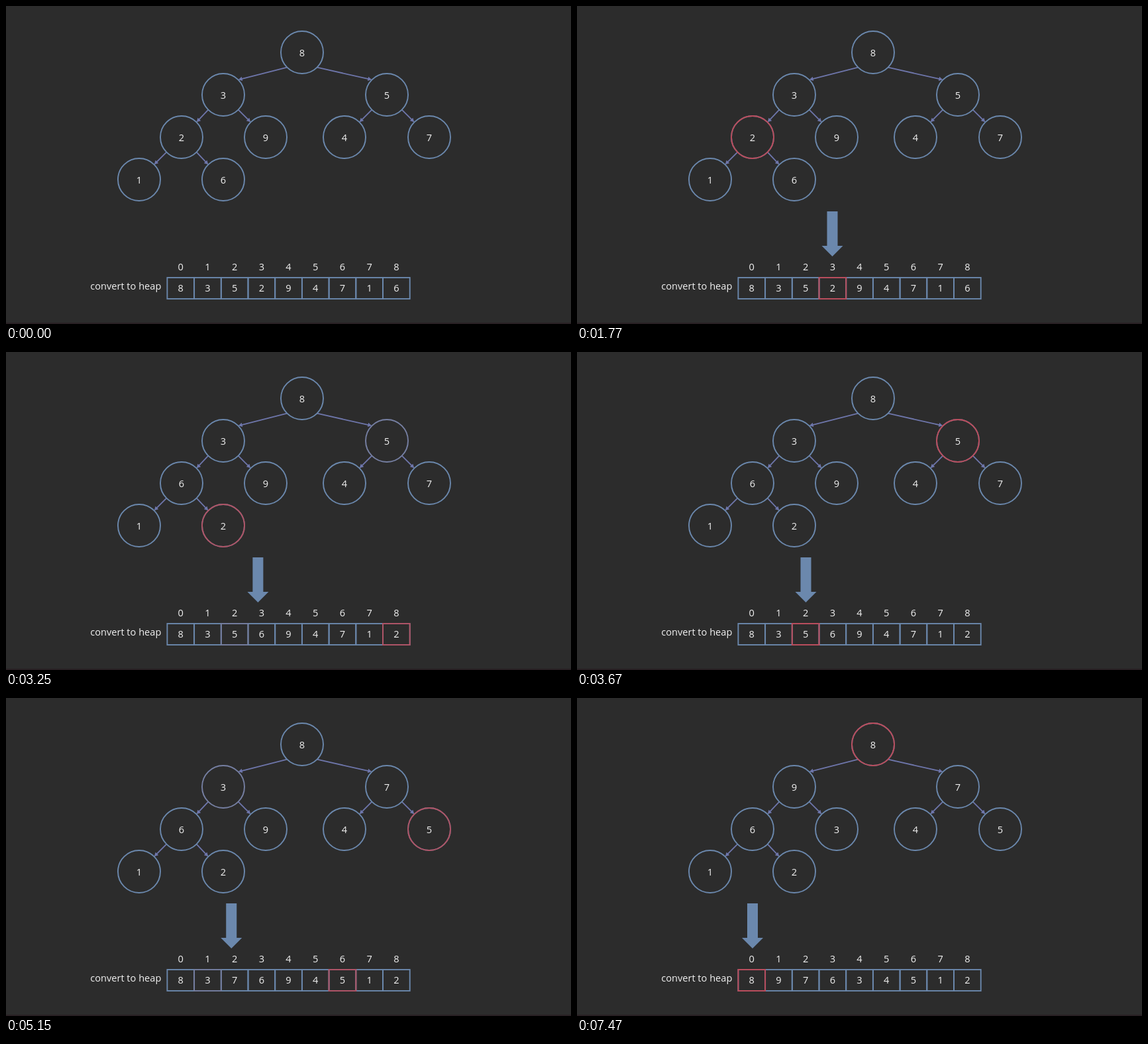
Write an HTML page that moves like this. It is 853 px wide and 480 px high and loops after 8 s.

```html
<!DOCTYPE html>
<html lang="en">
<head>
<meta charset="utf-8">
<title>Convert to heap</title>
<style>
  html, body { margin: 0; width: 100%; height: 100%; overflow: hidden; background: #2c2c2c; }
  svg { display: block; width: 100vw; height: 100vh; }
  text { font: 14.6px "Open Sans", "Noto Sans", sans-serif; fill: #f2f2f2; text-anchor: middle; }
  .line { fill: none; stroke: #6b88ad; stroke-width: 1.9; }
  .hot { fill: none; stroke: #bd4b5a; stroke-width: 1.9; }
  .link line { stroke: #6e76ab; stroke-width: 1.8; }
  .link path { fill: #6e76ab; }
</style>
</head>
<body>
<svg id="stage" viewBox="0 0 853 480"></svg>
<script>
const LOOP = 8000, FIRST = 400, PERIOD = 950, TICK = 60, MORPH = 500;
const CELL_X = 243.4, CELL_W = 40.7;
const NODES = [[447, 70], [328, 134], [575, 134], [265, 198], [392, 198],
               [511, 198], [639, 198], [201, 262], [328, 262]];
const ARROW_X = [265, 304.5, 345.5, 385.5, 426.4];

// Array contents, highlighted value, index under the arrow
const STATES = [
  ["835294716", "", 4],
  ["835294716", "9", 4],
  ["835294716", "2", 3],
  ["835694712", "2", 3],
  ["835694712", "5", 2],
  ["837694512", "5", 2],
  ["837694512", "3", 1],
  ["897634512", "3", 1],
  ["897634512", "8", 0]
].map(([order, hot, arrow]) => ({ order, hot, arrow }));

const stage = document.getElementById("stage");

function add(parent, tag, attrs, text) {
  const el = document.createElementNS("http://www.w3.org/2000/svg", tag);
  for (const name in attrs) el.setAttribute(name, attrs[name]);
  if (text !== undefined) el.textContent = text;
  parent.appendChild(el);
  return el;
}

const set = (el, name, value) => el.setAttribute(name, value);
const mix = (a, b, p) => a + (b - a) * p;
const clamp = v => Math.max(0, Math.min(1, v));

// cubic-bezier(.25, .1, .25, 1)
function ease(x) {
  const curve = (a, b, s) => 3 * a * s * (1 - s) ** 2 + 3 * b * s * s * (1 - s) + s ** 3;
  let lo = 0, hi = 1;
  for (let i = 0; i < 24; i++) {
    const mid = (lo + hi) / 2;
    if (curve(0.25, 0.25, mid) < x) lo = mid; else hi = mid;
  }
  return curve(0.1, 1, lo);
}

const parentOf = i => (i - 1) >> 1;

function makeLink(child) {
  const [px, py] = NODES[parentOf(child)], [cx, cy] = NODES[child];
  const side = Math.sign(cx - px), d = 22.7;
  const x1 = px + side * d, y1 = py + d, x2 = cx - side * d, y2 = cy - d;
  const angle = Math.atan2(y2 - y1, x2 - x1);
  const g = add(stage, "g", { class: "link" });
  add(g, "line", { x1, y1, x2: x2 - 4 * Math.cos(angle), y2: y2 - 4 * Math.sin(angle) });
  add(g, "path", {
    d: "M0 0L-6 -3.2V3.2Z",
    transform: `translate(${x2} ${y2}) rotate(${angle * 180 / Math.PI})`
  });
  return g;
}

function makeNode(value) {
  const g = add(stage, "g", {});
  add(g, "circle", { r: 32, class: "line" });
  const hot = add(g, "circle", { r: 32, class: "hot" });
  add(g, "text", { y: 5.6 }, value);
  return { value, g, hot };
}

function makeCell(i) {
  const x = CELL_X + i * CELL_W, mid = x + CELL_W / 2;
  const box = { x, y: 410, width: CELL_W, height: 32 };
  add(stage, "rect", { ...box, class: "line" });
  add(stage, "text", { x: mid, y: 399.2 }, i);
  return { box, before: add(stage, "text", { x: mid, y: 431.3 }),
           after: add(stage, "text", { x: mid, y: 431.3 }) };
}

add(stage, "rect", { width: 853, height: 480, fill: "#2c2c2c" });
add(stage, "rect", { y: 478, width: 853, height: 2, fill: "#282024" });
const links = NODES.slice(1).map((_, i) => makeLink(i + 1));
const nodes = [..."123456789"].map(makeNode);
add(stage, "text", { x: 180.8, y: 428 }, "convert to heap");
const cells = NODES.map((_, i) => makeCell(i));
for (const cell of cells) cell.hot = add(stage, "rect", { ...cell.box, class: "hot" });
const arrow = add(stage, "path", { d: "M-8 310H8V362H16L0 378L-16 362H-8Z", fill: "#6b88ad" });

function draw(from, to, t) {
  const p = t < 0.95 ? ease(t) : 1;
  const heat = (a, b) => mix(+a, +b, p);
  const swapped = i => from.order[i] !== to.order[i];

  nodes.forEach(({ value, g, hot }) => {
    const a = NODES[from.order.indexOf(value)], b = NODES[to.order.indexOf(value)];
    set(g, "transform", `translate(${mix(a[0], b[0], p)} ${mix(a[1], b[1], p)})`);
    set(hot, "opacity", heat(from.hot === value, to.hot === value));
  });

  links.forEach((link, i) => {
    const moving = swapped(i + 1) || swapped(parentOf(i + 1));
    set(link, "opacity", moving ? Math.max(1 - p, clamp((t - 0.5) / 0.46)) : 1);
  });

  cells.forEach((cell, i) => {
    const a = from.order[i], b = to.order[i];
    cell.before.textContent = a;
    cell.after.textContent = b;
    set(cell.before, "opacity", a === b ? 0 : 1 - p);
    set(cell.after, "opacity", a === b ? 1 : p);
    set(cell.hot, "opacity", heat(from.hot === a, to.hot === b));
  });

  set(arrow, "transform", `translate(${mix(ARROW_X[from.arrow], ARROW_X[to.arrow], p)} 0)`);
  set(arrow, "opacity", heat(from.hot !== "", to.hot !== ""));
}

function render(time) {
  const since = time % LOOP - FIRST;
  if (since < 0) return draw(STATES[0], STATES[0], 1);
  const step = Math.floor(since / PERIOD);
  const tick = Math.min(7, Math.floor((since - step * PERIOD) / TICK));
  draw(STATES[step], STATES[step + 1], (tick + 1) * TICK / MORPH);
}

const start = performance.now();
function loop() {
  render(performance.now() - start);
  requestAnimationFrame(loop);
}
loop();
</script>
</body>
</html>
```
